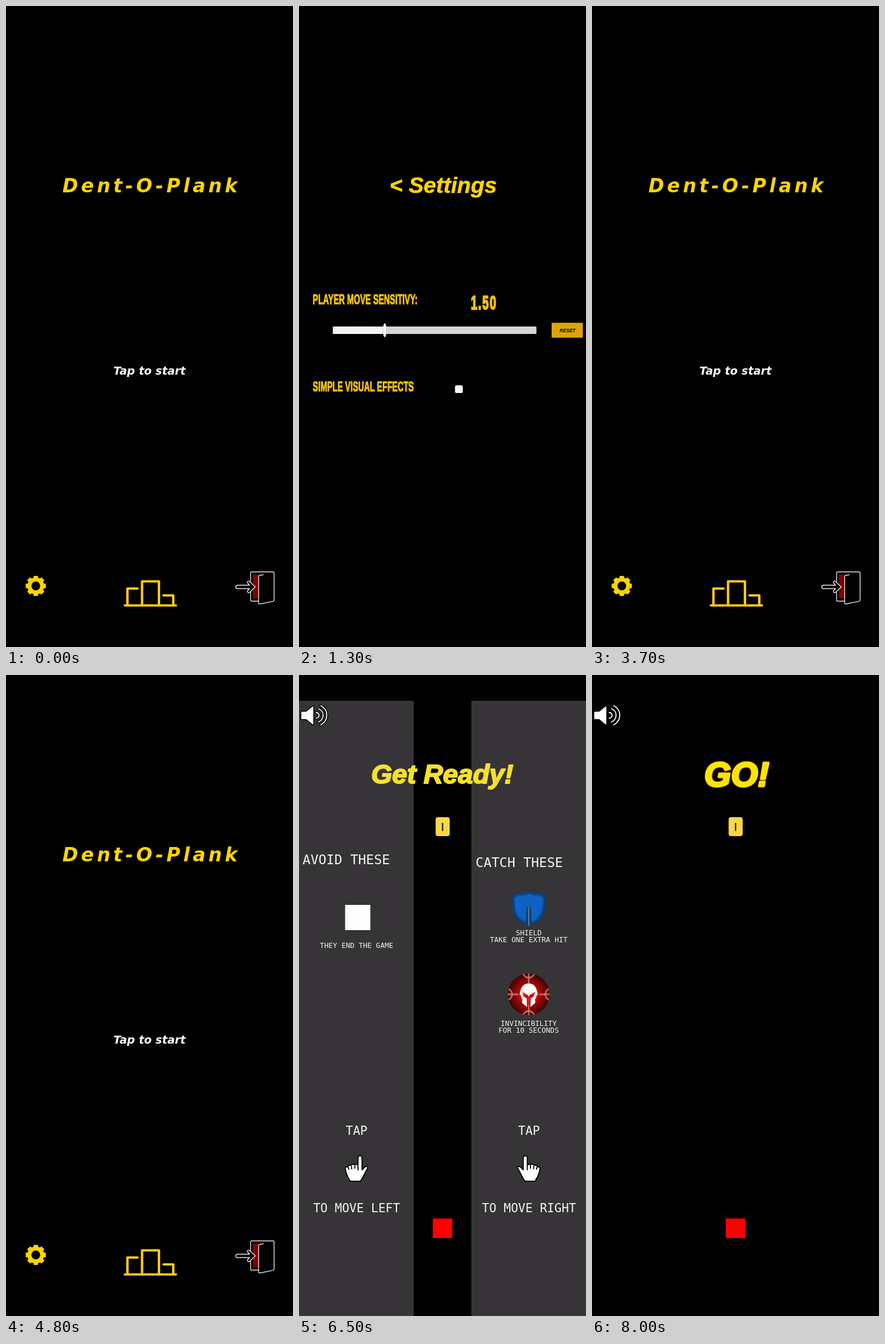
An HTML page for the animation above (8100 ms loop, 501 by 1118 pixels).

```html
<!DOCTYPE html>
<html lang="en">
<head>
<meta charset="utf-8">
<title>Block game menu</title>
<style>
html, body { margin: 0; width: 100%; height: 100%; overflow: hidden; background: #000; }
svg { display: block; width: 100%; height: 100%; }
text { white-space: pre; }
.head { font: italic bold 39px "Liberation Sans", Arial, sans-serif; fill: #ffd500; stroke-linejoin: round; }
.wide { font-family: "DejaVu Sans", sans-serif; }
.label { font: bold 24px "Liberation Sans", Arial, sans-serif; fill: #f2c10c; stroke: #f2c10c; stroke-width: 1.2; letter-spacing: .1px; }
.mono { font: 12.5px "DejaVu Sans Mono", monospace; fill: #f4f4f4; text-anchor: middle; }
.big { font-size: 23px; }
.mid { font-size: 21px; }
.line { fill: none; stroke-linecap: round; stroke-linejoin: round; }
#go { font-size: 60px; fill: #f7e600; stroke: #f7e600; stroke-width: 3.4; filter: drop-shadow(0 0 1px #f03c10); }
#ready { font-size: 47px; fill: #f5e12c; stroke: #f5e12c; stroke-width: 2; }
</style>
</head>
<body>
<svg viewBox="0 0 501 1118" preserveAspectRatio="none">
  <defs>
    <radialGradient id="ruby">
      <stop offset="0" stop-color="#f00808"/>
      <stop offset=".45" stop-color="#b40606"/>
      <stop offset="1" stop-color="#3c0505"/>
    </radialGradient>
    <radialGradient id="glow">
      <stop offset=".6" stop-color="#77788c" stop-opacity=".65"/>
      <stop offset="1" stop-color="#33344a" stop-opacity="0"/>
    </radialGradient>
    <filter id="soft"><feGaussianBlur stdDeviation="1"/></filter>
    <clipPath id="disc"><circle cx="401" cy="557" r="36.5"/></clipPath>
    <path id="hand" d="M103 863V842a3.500 3.500 0 0 1 7 0V863L114 859Q119 855 120 859Q119 862 116 867L112 875Q109 880 107 883H89Q88 879 85 875Q82 869 81 862Q80 857 85 858Q86 854 91 855Q93 852 97 854Q100 852 103 855Z
      M86 858L87 863M91.5 856L92 862M97.5 855V861"/>
    <g id="touch">
      <circle r="16" fill="url(#glow)"/>
      <circle r="11.2" fill="#d2d2d6" fill-opacity=".78"/>
    </g>
  </defs>
  <rect width="501" height="1118"/>

  <text id="title" class="head wide" x="98.5" y="325.3" font-size="33" style="font-size:33px;letter-spacing:5.2px">Dent-O-Plank</text>

  <g id="menu">
    <text class="head wide" x="187.500" y="642.500" style="font-size:19.300px;fill:#fff">Tap to start</text>
    <g id="gear" transform="translate(52 1011.5)" fill="#fbd500">
      <circle r="11.2" fill="none" stroke="#fbd500" stroke-width="7"/>
    </g>
    <path class="line" stroke="#ffc91c" stroke-width="4.2" d="M207.5 1045.5H296.5M212 1044V1016H229.5M237.5 1044V1003.5H267V1044M275 1028H292V1044"/>
    <rect x="431" y="992" width="10" height="41" fill="#850000"/>
    <path class="line" stroke="#e6e6e6" stroke-width="1.4" d="M427 1004V989Q427 987 429 987H466Q468 987 468 989V1036Q468 1038 466 1038.4L443 1043Q441 1043 441 1041V995Q441 993.5 443 993L449 992M427 1022V1036Q427 1038 429 1038H440.5"/>
    <path stroke="#e6e6e6" stroke-width="1.4" stroke-linejoin="round" d="M404 1010.3H425L421.5 1006Q421 1002 425 1003.5L435 1013.2L425 1023Q421 1024 421.5 1020L425 1016.2H404Q401 1016 401 1013.2Q401 1010.5 404 1010.3Z"/>
  </g>

  <g id="settings">
    <text class="head" x="158" y="326" stroke="#ffd500" stroke-width=".6">&lt; Settings</text>
    <text class="label" transform="translate(24 520) scale(.585 1)">PLAYER MOVE SENSITIVY:</text>
    <text class="label" transform="translate(300 529) scale(.585 1)" style="font-size:34px;letter-spacing:3px;stroke-width:2.4">1.50</text>
    <text class="label" transform="translate(24 671.5) scale(.585 1)">SIMPLE VISUAL EFFECTS</text>
    <rect x="59" y="559" width="355.5" height="13" rx="1.5" fill="#d4d4d4"/>
    <rect x="59" y="559" width="91" height="13" rx="1.5" fill="#f4f4f4"/>
    <ellipse cx="149.7" cy="565.5" rx="3" ry="12" fill="#fff" stroke="#b8b8b8" stroke-width=".7"/>
    <rect x="441" y="552.5" width="54.5" height="26" rx="1" fill="#dda508"/>
    <text class="head" x="455" y="569" style="font-size:8.300px;fill:#000">RESET</text>
    <rect x="272.3" y="661.5" width="13.6" height="13.6" rx="3.2" fill="#f8f8f8"/>
  </g>

  <g id="game">
    <g id="panels">
      <path fill="#363436" stroke="#403e40" d="M.5 45.5H199.5V1117.5H.5ZM301.5 45.5H500.5V1117.5H301.5Z"/>
      <text class="mono big" x="82.5" y="330">AVOID THESE</text>
      <text class="mono big" x="384.5" y="334.5">CATCH THESE</text>
      <rect x="80.5" y="401" width="44" height="44" fill="#fdfdfd"/>
      <text class="mono" x="100.5" y="475.5">THEY END THE GAME</text>

      <path fill="#0a62c4" stroke="#0d4177" stroke-width="5" stroke-linejoin="round" filter="url(#soft)" d="M401 378.5Q411 384 421 381.500L430 390Q427 396 428 405Q425 428 401 435.500Q377 428 374 405Q375 396 372 390L381 381.500Q391 384 401 378.500Z"/>
      <path fill="#0d4177" d="M395.5 436L397 406Q401 400 405 406L406.5 436Z"/>
      <path class="line" stroke="#8995a5" stroke-width="1.3" d="M401 405V437"/>
      <text class="mono" x="401" y="454">SHIELD</text>
      <text class="mono" x="401" y="466">TAKE ONE EXTRA HIT</text>

      <g clip-path="url(#disc)">
        <circle cx="401" cy="557" r="36.5" fill="url(#ruby)"/>
        <g class="line" stroke="#dc8585" stroke-opacity=".75" stroke-width="2.8">
          <path d="M401 520V594M364 557H438"/>
          <circle cx="401" cy="518" r="10"/><circle cx="401" cy="596" r="10"/>
          <circle cx="362" cy="557" r="10"/><circle cx="440" cy="557" r="10"/>
        </g>
        <circle cx="401" cy="557" r="19" fill="#d00808" fill-opacity=".65"/>
        <path fill="#fff" d="M385.5 556Q388 538 401 538Q414 538 416.5 556L412 566L412.500 572L404 579L404.500 564L410 560.500L412 553L402.500 558L401 561L399.500 558L390 553L392 560.500L397.500 564L398 579L389.500 572L390 566Z"/>
      </g>
      <text class="mono" x="401" y="612">INVINCIBILITY</text>
      <text class="mono" x="401" y="624">FOR 10 SECONDS</text>

      <text class="mono mid" x="100.5" y="802">TAP</text>
      <text class="mono mid" x="401.5" y="802">TAP</text>
      <g fill="#fff" stroke="#000" stroke-width="1.8" stroke-linejoin="round">
        <use href="#hand"/>
        <use href="#hand" transform="translate(501.5) scale(-1 1)"/>
      </g>
      <text class="mono mid" x="100.5" y="936.5">TO MOVE LEFT</text>
      <text class="mono mid" x="401.5" y="936.5">TO MOVE RIGHT</text>
    </g>

    <g id="speaker"></g>
    <rect x="238.5" y="248" width="24.5" height="33" rx="4" fill="#f8d844"/>
    <text x="250.7" y="272" text-anchor="middle" font-family="Liberation Sans, Arial, sans-serif" font-size="21">I</text>
    <rect x="233.5" y="948" width="34" height="34" fill="#f00"/>
    <text id="ready" class="head" x="126" y="189">Get Ready!</text>
    <text id="go" class="head" x="196" y="194">GO!</text>
  </g>

  <use id="tapGear" href="#touch" x="52" y="1011"/>
  <use id="tapBack" href="#touch" x="199" y="296"/>
  <use id="tapStart" href="#touch" x="199" y="299"/>
</svg>
<script>
const LOOP = 8100, STEP = 100;
const $ = id => document.getElementById(id);

const gear = $('gear');
for (let a = 0; a < 360; a += 45) {
  gear.insertAdjacentHTML('beforeend',
    `<rect x="-3.9" y="-17.6" width="7.8" height="5.6" rx="1" transform="rotate(${a})"/>`);
}

// A dark pass under a white pass gives the speaker its outline.
const cone = 'M5 65H13L24 56V85L13 76H5Z';
const waves = 'M30 65.5Q35 66 35 70.2Q35 74.5 30 75.5M34 59Q42 62 42 70.2Q42 78 34 82M38 53.5Q48.5 59 48.5 70.2Q48.5 81 38 87';
const speaker = (color, grow) => `<g class="line" stroke="${color}">
  <path d="${cone}" fill="${color}" stroke-width="${2 + grow}"/>
  <path d="${waves}" stroke-width="${1.8 + grow}"/></g>`;
$('speaker').innerHTML = speaker('#000', 3) + speaker('#fff', 0);

// Opacity by time: [ms, value]; a repeated time is a hard change.
const tracks = {
  title: [[0, 1], [500, 1], [800, 0], [3100, 0], [3400, 1], [4800, 1], [5300, 0]],
  menu: [[0, 1], [500, 1], [900, 0], [3100, 0], [3400, 1], [5000, 1], [5600, 0]],
  settings: [[0, 0], [800, 0], [1200, 1], [2800, 1], [3100, 0]],
  game: [[0, 0], [6500, 0], [6500, 1]],
  panels: [[0, 1], [7300, 1], [7700, 0]],
  ready: [[0, 1], [7400, 1], [7400, 0]],
  go: [[0, 0], [7400, 0], [7400, 1]],
  tapGear: [[0, 0], [300, 0], [300, 1], [500, 1], [600, 0]],
  tapBack: [[0, 0], [2700, 0], [2700, 1], [2800, 1], [2900, 0]],
  tapStart: [[0, 0], [4500, 0], [4500, 1], [4600, 1], [4700, 0]]
};

function valueAt(keys, t) {
  const next = keys.findIndex(k => k[0] > t);
  if (next < 0) return keys[keys.length - 1][1];
  const [t0, v0] = keys[next - 1], [t1, v1] = keys[next];
  return v0 + (v1 - v0) * (t - t0) / (t1 - t0);
}

const parts = Object.entries(tracks).map(([id, keys]) => [$(id), keys]);
const start = performance.now();

function draw(now) {
  const elapsed = Math.max(0, now - start) % LOOP;
  const t = Math.floor(elapsed / STEP) * STEP;
  for (const [el, keys] of parts) el.style.opacity = valueAt(keys, t);
  requestAnimationFrame(draw);
}
draw(start);
</script>
</body>
</html>
```
